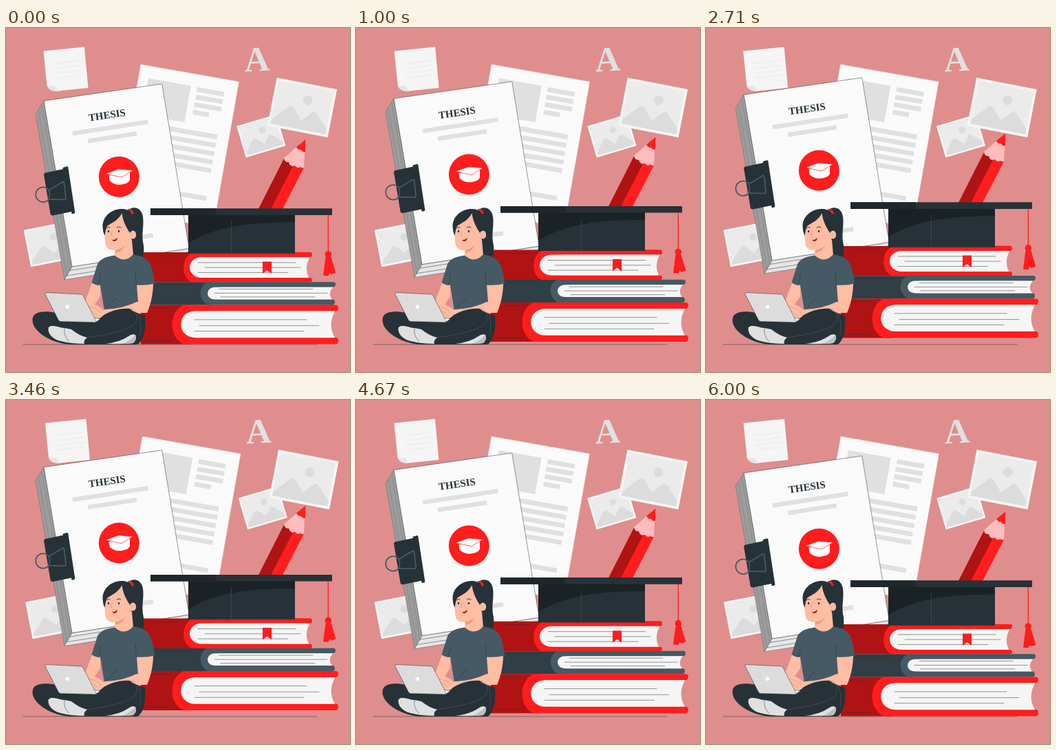
Write an HTML page that moves like this. It is 500 px wide and 500 px high and loops after 6.04 s.

```html
<!DOCTYPE html>
<html lang="en">
<head>
<meta charset="utf-8">
<title>Thesis</title>
<style>
  html, body { margin: 0; width: 100%; height: 100%; overflow: hidden; background: #df8e8d; }
  svg { display: block; width: 100%; height: 100%; }
  text { font-family: "Liberation Serif", serif; font-weight: 700; }
  .red { fill: #ff1d1d; } .wine { fill: #b01313; }
  .dark { fill: #263238; } .slate { fill: #455a64; }
  .page { fill: #f5f5f5; } .gray { fill: #e0e0e0; } .skin { fill: #ffbda3; }
  .line { fill: none; stroke: #263238; stroke-width: .5; stroke-linecap: round; }
  .faint { fill: none; stroke: #e4e4e4; stroke-width: .7; }
  .bar { fill: none; stroke: #e0e0e0; stroke-width: 6.4; }
</style>
</head>
<body>
<svg viewBox="0 0 500 500">
  <defs>
    <symbol id="scene" viewBox="0 0 90 72" preserveAspectRatio="none">
      <path fill="#f5f5f5" d="M0 0H90V72H0Z"/>
      <path fill="#ebebeb" d="M4 4H86V68H4Z"/>
      <g fill="#dcdcdc">
        <circle cx="51" cy="24" r="7"/>
        <path d="M4 62L25 39Q29 35 33 39L47 55L60 41Q64 37 68 41L86 60V68H4Z"/>
      </g>
    </symbol>
  </defs>

  <g id="drift">
    <path class="page" d="M54.5 33.500L114 27.500L119.500 87L76 91.600Q70 92 66 90.500Q60 88 59.500 83Z"/>
    <path fill="#e6e6e6" d="M59.500 82C62 87 68 83 70 84C73 86 73 90 77 91.500Q70 92.300 66 90.500Q60 88 59.500 82Z"/>
    <path class="faint" d="M70 52L109 47M71 59L110 54M71 66L111 61M72 73L111 68"/>
    <g id="sheet" transform="translate(196 53) rotate(10)">
      <path fill="#fafafa" stroke="#e6e6e6" stroke-width=".6" d="M0 0H144.700V215H0Z"/>
      <path class="gray" d="M14.300 17.800H77V71.600H14.300Z"/>
    </g>
    <use href="#scene" width="72" height="55" transform="translate(25.500 293.500) rotate(-11)"/>
    <use href="#scene" width="60.500" height="48" transform="translate(335 142.500) rotate(-16.500)"/>
    <use href="#scene" width="89.500" height="71.500" transform="translate(393.500 72) rotate(11)"/>
    <text class="gray" font-size="51" transform="translate(347 63.500) rotate(-3)">A</text>
  </g>

  <path class="line" d="M25 460H452"/>

  <g id="lift">
    <!-- thesis block -->
    <path fill="#9c9c9c" stroke="#5c686d" stroke-width=".5" d="M55 106L43 125.500L85 366L96 347Z"/>
    <path fill="#e6e6e6" stroke="#455a64" stroke-width=".5" d="M96 347L85 366L262 338L266 320.500Z"/>
    <path class="line" style="stroke:#7a7a7a" d="M52 112L93 352.500M47 120L88.500 360"/>
    <path class="line" d="M93 352.500L264 326M88.500 360L263 333"/>
    <path fill="#fafafa" stroke="#263238" stroke-width=".5" d="M55 106L226.700 81.300L266.200 320.500L96 347Z"/>
    <text fill="#263238" font-size="15" text-anchor="middle" transform="translate(147.500 131.500) rotate(-8.400)">THESIS</text>
    <path class="bar" d="M97 153.300L206.500 136.500M119 164.300L190 153.500M160 309L214 301.500"/>
    <circle class="red" cx="164.300" cy="216.200" r="29.500"/>
    <path fill="#fff" d="M149.500 214.500L150.500 222Q158 229 168 227.500Q178 226 180 221L180 210Z"/>
    <path fill="#fff" stroke="#ff1d1d" stroke-width=".7" d="M144.500 212L163.500 205L184.500 207L168 217Z"/>

    <!-- binder clip -->
    <path class="dark" d="M55 213Q55 211 57 210.500L83 205L82.500 203L88.500 201.300Q90 201 90.300 202.500L100.300 268Q100 270 97.500 270L95.500 270L95 267L68 272.500Q65 272.500 64.500 270Z"/>
    <path fill="none" stroke="#455a64" stroke-width="1.800" stroke-linejoin="round" d="M62 236L82 224Q84 223 84.500 225L87 247Q87 250 84 249.500L62 249M62 235.500A10.500 10.800 0 1 0 62 249Q65 242 62 235.500"/>

    <!-- pencil -->
    <path class="red" d="M404 190L367 263H402L433 203L420 195Z"/>
    <path class="wine" d="M404 190L367 263H385L419 197Z"/>
    <path fill="#ffbcbc" d="M435 162L404 189Q405 196 411 195Q413 203 420 200Q423 205 428 202Q431 204 433 203Z"/>
    <path class="red" d="M435.300 162L422 173Q425 178 429 177Q431 181 435 180Z"/>

    <!-- top book -->
    <path class="wine" d="M199 326H280V369.500H199Z"/>
    <path class="red" d="M272 325.700H442Q445 326 445 329.500T442 333H300V363H442Q445 363.500 445 366.300T442 369.500H270C254 362 254 334 272 325.700Z"/>
    <path class="page" d="M285 333H441.500Q433 348 440 363H285C261 363 261 333 285 333Z"/>
    <path class="line" d="M279 341H421M289 348.200H428M279 355.500H410M213 331H250"/>
    <path class="red" d="M373 339.500H386V357L379.500 352L373 357Z"/>

    <!-- middle book -->
    <path fill="#303e46" d="M203 369.500H300V402.500H203Z"/>
    <path class="slate" d="M292 369.200H476Q479 369.500 479 372.500T476 376.500H310V394.500H475Q478 395 478 398.500T475 402.500H293C280 394 279 378 292 369.200Z"/>
    <path class="page" d="M304 376.700H475Q467 386 474 394.500H304C289.500 394.500 289.500 376.700 304 376.700Z"/>
    <path class="line" d="M310 379.500H446M303 385.500H467M312 391H449M219 373H270"/>

    <!-- bottom book -->
    <path class="wine" d="M196 402.500H270V459.500H196Z"/>
    <path class="red" d="M258 402.500H480Q483 403 483 406.700T480 411.500H290V450H480Q483 450.500 483 454.500T480 459.500H258C236 449 236 413 258 402.500Z"/>
    <path class="page" d="M276 411.300H478.500Q467 431 478 450.200H276C247 450.200 247 411.300 276 411.300Z"/>
    <path class="line" d="M274 424H437M281 432.700H455M274 440.700H433M204 407H240M204 454.500H240"/>

    <!-- cap and tassel -->
    <path fill="#1b2226" d="M265 271H420V327.500H265Z"/>
    <path class="dark" d="M265.500 312C300 292 340 282 420 282.500V327.500H265.500Z"/>
    <path class="line" style="stroke:#455a64" d="M327.500 281V327"/>
    <path class="dark" d="M210 262.300H474V272H210Z"/>
    <path fill="#1e272c" d="M210 262.300H305V272H210Z"/>
    <path fill="none" stroke="#ff1d1d" stroke-width="1.300" d="M468.300 272V326"/>
    <circle class="red" cx="468.300" cy="329" r="4.800"/>
    <path class="red" d="M464.500 333H472.500L479.500 356L473 358L470.500 356L468 360.500L461 359.500Z"/>
  </g>

  <g id="student">
    <path class="dark" d="M176 267C181 259 196 258 199 274C201 288 196 300 200 316Q201 326 199 334L180 336L183 290Z"/>
    <!-- arms -->
    <path class="skin" d="M126 368L113 403L124 409L137 390V368Z"/>
    <path class="skin" d="M189 370H214C214 385 211 400 205 414L188 414Z"/>
    <!-- neck and face -->
    <path class="skin" d="M158 318L158 333Q170 342 185 331L182 296Z"/>
    <path fill="#ef9a80" d="M159 321Q168 320 174 313Q170 325 159.500 327Z"/>
    <path class="skin" d="M146 285C143 295 143 307 145 316C148 325 162 324 169 319C176 314 179 307 182 300L180 280L168 266Z"/>
    <path class="dark" d="M140.500 289C140 272 156 262 170 263C184 264 191 277 188 296L183 309L181 299C176 292 170 282 168.500 269C164 279 153 284 148 287C145 290 144.500 297 143.500 302Q140.500 296 140.500 289Z"/>
    <ellipse class="skin" cx="184.500" cy="300.500" rx="4.600" ry="6"/>
    <path class="line" style="stroke:#ef8a70" d="M183 303Q182 298 186 298"/>
    <path class="red" d="M176 264Q182 260 186 269L183 271Q181 265 176 264Z"/>
    <g class="dark"><ellipse cx="149" cy="295.500" rx="1.200" ry="1.800"/><ellipse cx="164" cy="295.500" rx="1.200" ry="1.800"/></g>
    <path class="line" style="stroke-width:.9" d="M146.500 290.500Q148.500 288.500 151 290M161 290Q164 287.500 167 290"/>
    <path class="line" style="stroke:#d9644f" d="M154.500 295Q151 301 154 302"/>
    <path fill="#b01313" d="M154 308Q159 308.500 161.500 304.500Q162 310 156.500 310Z"/>
    <!-- shirt -->
    <path class="slate" d="M158 330.500C147 332 137 335 133 343L124.500 370Q130 374.500 137 373.500L143 411Q168 416 192 399L190 373.500Q204 374.500 216 371.500C214 355 212 344 205 337C198 331 190 330 184.500 329.500Q172 343 158 330.500Z"/>
    <path class="line" d="M133.500 374Q138 366 137 358M190 374Q187 362 189 354M145 411Q152 398 162 392"/>
    <path class="skin" d="M190 398L208 401Q205 411 196 414L150 420L136 423L130 414L144 409Q170 408 190 398Z"/>
    <!-- legs -->
    <path class="dark" d="M38.500 425C38 413 52 410 73 414L80 427H130L138 420C151 411 166 407 180 408Q185 413 202 418C203 434 202 450 193 459Q190 460.500 186 460H96C70 460 39 443 38.500 425Z"/>
    <path class="line" style="stroke:#56656c" d="M182 408C193 412 194 427 182 434C167 442 145 446 117 450M191 414Q198 424 195 446"/>
    <path class="gray" d="M61.500 437C62 431 72 433 80 435.500Q88 436 95 438Q106 447 118 450Q112 454 114 459Q94 459 79 455C67 452 61 444 61.500 437Z"/>
    <path class="gray" d="M144 459Q165 457 178 448Q183 444 188 446Q191 452 185 458Q178 459.500 144 459Z"/>
    <path fill="#bdbdbd" d="M168 459Q181 455 188 446Q191 452 185 458Z"/>
    <path class="line" d="M85 437Q83 446 91 455"/>
    <!-- hands -->
    <path class="skin" d="M114 402Q124 398 132 403Q142 408 144 414L139 420L130 425L125 417Q119 414 114 402Z"/>
    <path class="line" style="stroke:#e07f66" d="M119 405Q130 406 138 414M121 411Q128 412 134 418"/>
    <!-- laptop -->
    <path fill="#f5f5f5" stroke="#263238" stroke-width=".5" d="M77 426L130 428L137 423L124 420Z"/>
    <path fill="#dcdcdc" stroke="#263238" stroke-width=".5" stroke-linejoin="round" d="M58 384.500L109 387Q111 387 112 389L131 426Q131.500 428 129 427.700L79 426.500Q77 426 76 424L57 387Q56.500 384.500 58 384.500Z"/>
    <circle fill="#fff" cx="89.300" cy="405.300" r="2.700"/>
  </g>
</svg>

<script>
const LOOP = 6040, CYCLE = 6000, LEAD = 20, RISE = 10;
const sway = [0, -1, 2, -4, 4, -4, 4, -4, 2, -1, 0];
const byId = id => document.getElementById(id);
const drift = byId("drift"), lift = byId("lift"), sheet = byId("sheet");

function addBar(x, y, width) {
  const bar = document.createElementNS(sheet.namespaceURI, "path");
  bar.setAttribute("class", "gray");
  bar.setAttribute("d", `M${x} ${y}h${width}v6.9h${-width}Z`);
  sheet.append(bar);
}
for (let i = 0; i < 4; i++) addBar(86.5, 18.2 + i * 11.1, i < 3 ? 40 : 24);
for (let i = 0; i < 5; i++) addBar(14.3, 81.2 + i * 12.4, 113.2);
addBar(14.3, 172, 113.2);

function render(time) {
  const phase = ((time % LOOP + LEAD) % CYCLE) / CYCLE;
  const step = phase * (sway.length - 1), i = Math.floor(step);
  const x = sway[i] + (sway[i + 1] - sway[i]) * (step - i);
  const y = -RISE * (1 - Math.abs(1 - 2 * phase));
  drift.setAttribute("transform", `translate(${x.toFixed(3)} 0)`);
  lift.setAttribute("transform", `translate(0 ${y.toFixed(3)})`);
}

const start = performance.now();
function tick() {
  render(performance.now() - start);
  requestAnimationFrame(tick);
}
tick();
</script>
</body>
</html>
```
